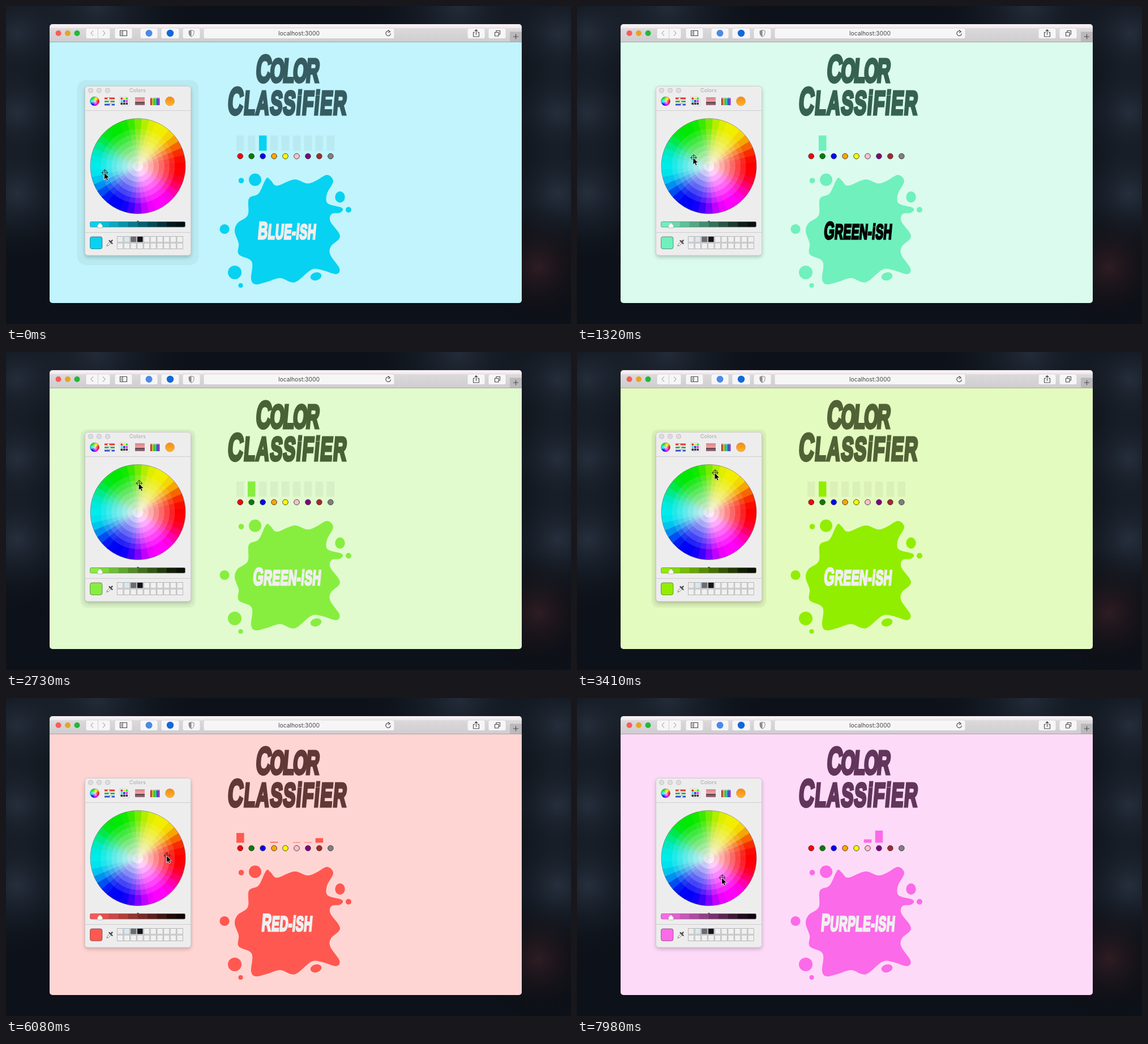
Write an HTML page with a canvas that moves like this. It is 998 px wide and 561 px high and loops after 8000 ms.

```html
<!DOCTYPE html>
<html lang="en">
<head>
<meta charset="utf-8">
<title>Color Classifier</title>
<style>
  html, body { margin: 0; width: 100%; height: 100%; overflow: hidden; background: #080b12; }
  canvas, svg { position: absolute; left: 0; top: 0; width: 998px; height: 561px; display: block; }
  .ui { font-family: Inter, "Liberation Sans", sans-serif; text-anchor: middle; }
  .comic { font-family: "Liberation Sans", Arial, sans-serif; font-weight: 700; text-anchor: middle; stroke-linejoin: miter; }
  .ink { fill: var(--ink); stroke: var(--ink); }
  .splat { fill: var(--c); }
  .btn { fill: #f7f6f7; stroke: #c9c7c9; stroke-width: .6; }
  .line { fill: none; stroke: #4a4a4a; stroke-width: 1.1; }
  .panel { filter: drop-shadow(0 3px 3px rgba(0,0,0,.2)); }
</style>
</head>
<body>
<canvas id="photo" width="998" height="561"></canvas>
<svg id="stage" viewBox="0 0 998 561">
  <defs>
    <clipPath id="win"><rect x="77" y="32" width="834" height="492" rx="5"/></clipPath>
    <clipPath id="barClip"><rect x="148.5" y="380.5" width="168" height="9.5" rx="2"/></clipPath>
    <linearGradient id="tool" x2="0" y2="1">
      <stop offset="0" stop-color="#f7f0f4"/><stop offset=".18" stop-color="#f3edf0"/>
      <stop offset=".26" stop-color="#dcd9db"/><stop offset="1" stop-color="#cfcdcf"/>
    </linearGradient>
    <linearGradient id="dusk" x2="0" y2="1">
      <stop offset="0" stop-color="#d67fa0"/><stop offset=".55" stop-color="#f0a890"/>
      <stop offset=".6" stop-color="#5a4550"/><stop offset="1" stop-color="#a76f80"/>
    </linearGradient>
    <linearGradient id="amber" x2="0" y2="1">
      <stop offset="0" stop-color="#f58a12"/><stop offset="1" stop-color="#fcb433"/>
    </linearGradient>
  </defs>

  <g clip-path="url(#win)">
    <rect x="77" y="63" width="834" height="461" fill="var(--bg)"/>
    <rect x="77" y="32" width="834" height="31" fill="url(#tool)"/>
    <path d="M77 63.5H911" stroke="#a8a6a8"/>
    <rect x="890" y="45.5" width="21" height="17.5" fill="#bab8ba"/>
    <path class="line" d="M900.5 49.5v9M896 54h9"/>
    <g id="buttons"></g>
    <circle cx="92.5" cy="48" r="5" fill="#fc5b57"/>
    <circle cx="109" cy="48" r="5" fill="#e5a524"/>
    <circle cx="125.5" cy="48" r="5" fill="#22b83a"/>
    <path d="M162.5 39.5v18" stroke="#d0ced0"/>
    <path class="line" style="stroke:#a6a6a6" d="M154 43.5l-4 4.5 4 4.5M171 43.5l4 4.5-4 4.5"/>
    <path class="line" d="M201.5 43.5h12v9h-12zM206 43.5v9M203 46h1.5M203 48h1.5M203 50h1.5"/>
    <circle cx="252.5" cy="48" r="6" fill="#4a8ae8"/>
    <circle cx="290" cy="48" r="6.2" fill="#1268d8"/>
    <path d="M327.5 42.5l4.5 1.5v4q0 4-4.5 6.5-4.5-2.5-4.5-6.5v-4z" fill="#f7f6f7" stroke="#8b8b8b"/>
    <path d="M327.5 42.5v12q-4.5-2.5-4.5-6.5v-4z" fill="#8b8b8b"/>
    <text class="ui" x="517.5" y="52" font-size="10.3" fill="#454545">localhost:3000</text>
    <path class="line" d="M678.5 45.5a4.3 4.3 0 1 0 1 3M675 42.5l3.5 3-4 1.5"/>
    <path class="line" d="M828 46.5h-2.5v7.5h10v-7.5h-2.5M830.5 51v-9M827.8 44.5l2.7-2.7 2.7 2.7"/>
    <path class="line" d="M863.5 46.5h6.5v6.5h-6.5zM866 46v-2.500h6.500v6.500h-2"/>
  </g>

  <g id="title" class="ink"></g>
  <g id="bars"></g>
  <g id="splat" class="splat"></g>
  <g id="label"></g>

  <rect id="halo" fill="#000" fill-opacity=".045"/>
  <g class="panel"><rect x="139.5" y="141.5" width="187" height="298.5" rx="5" fill="#eeedee" stroke="#c3c3c3" stroke-width=".7"/></g>
  <g fill="#dfdddf" stroke="#c2c0c2">
    <circle cx="149.5" cy="149" r="4"/><circle cx="164.5" cy="149" r="4"/><circle cx="179.5" cy="149" r="4"/>
  </g>
  <text class="ui" x="232.5" y="152" font-size="8.8" letter-spacing=".3" fill="#a2a0a2">Colors</text>
  <g id="tabs"></g>
  <path d="M140 184.5H326M140 399.5H326" stroke="#cfcdcf"/>
  <g id="wheel"></g>
  <g id="slider" clip-path="url(#barClip)"></g>
  <rect x="148.5" y="380.5" width="168" height="9.5" rx="2" fill="none" stroke="#777" stroke-opacity=".7"/>
  <path d="M231 379h4l-2 2.5z" fill="#444"/>
  <path d="M166 382.5l4.5 4.5v4.5h-9v-4.5z" fill="#fff" stroke="#999" stroke-width=".6"/>
  <rect x="148.5" y="407" width="21.5" height="21.5" rx="3.5" fill="var(--c)" stroke="#000" stroke-opacity=".4"/>
  <path d="M178 423.5l1-3 5-5 2 2-5 5z" fill="#fff" stroke="#666" stroke-width=".9"/>
  <path d="M182.5 414l5 5M185 416.5l2.5-3" stroke="#4a4a4a" stroke-width="2.4" stroke-linecap="round"/>
  <g id="grid"></g>
  <g id="cross" fill="none" stroke="#222" stroke-opacity=".85"><circle r="4.2"/><path d="M-6 0H6M0-6V6"/></g>
  <path id="arrow" d="M0 0V12.5L2.9 9.8 4.8 14 7 13 5.2 9H9Z" fill="#000" stroke="#fff" stroke-width=".8"/>
</svg>

<script>
const LOOP = 8000, TICK = 108.5, LEAD = 17;
const NAMES = ['red', 'green', 'blue', 'orange', 'yellow', 'pink', 'purple', 'brown', 'gray'];

// Key picks on the wheel; "at" counts ticks, "mix" holds the classifier's scores.
const PICKS = [
  { at: 0, x: 174.5, y: 294, hsv: [188, .97, .945], halo: 14, mix: { blue: 1 } },
  { at: 12, x: 206, y: 267.5, hsv: [155.6, .533, .941], halo: 0, mix: { green: 1 } },
  { at: 20, x: 228, y: 247, hsv: [106, .504, .933], halo: 8, mix: { green: 1 } },
  { at: 31, x: 244, y: 213, hsv: [83.4, 1, .933], halo: 8, mix: { green: 1 } },
  { at: 36, x: 264, y: 224, hsv: [62, 1, .94], halo: 11, mix: { yellow: .9, green: .1 } },
  { at: 41, x: 280, y: 242, hsv: [43.5, 1, .957], halo: 14, mix: { green: .03, orange: .42, yellow: .05, brown: .57 } },
  { at: 55, x: 284.5, y: 278, hsv: [2.7, .686, 1], halo: 0, mix: { red: .64, orange: .06, pink: .03, purple: .03, brown: .3 } },
  { at: 73, x: 256.5, y: 317, hsv: [-52.1, .578, .984], halo: 0, mix: { pink: .22, purple: .8 } }
];

const $ = id => document.getElementById(id);
const stage = $('stage');

function set(el, attrs) {
  for (const k in attrs) el.setAttribute(k, attrs[k]);
  return el;
}
function add(parent, tag, attrs, text = '') {
  const el = set(document.createElementNS('http://www.w3.org/2000/svg', tag), attrs);
  if (text) el.textContent = text;
  parent.append(el);
  return el;
}
const rect = (g, x, y, width, height, more) => add(g, 'rect', { x, y, width, height, ...more });
const dot = (g, cx, cy, r, more) => add(g, 'circle', { cx, cy, r, ...more });

function hsv(h, s, v) {
  const channel = n => {
    const k = (n + h / 60 + 12) % 6;
    return Math.round(255 * v * (1 - s * Math.max(0, Math.min(k, 4 - k, 1))));
  };
  return [5, 3, 1].map(channel);
}
const rgb = c => `rgb(${c})`;

// Backdrop: frosty blue down both sides, dark above and below, a rusty corner.
function paintPhoto() {
  const ctx = $('photo').getContext('2d');
  const glow = (x, y, r, color) => {
    const g = ctx.createRadialGradient(x, y, 0, x, y, r);
    g.addColorStop(0, color);
    g.addColorStop(1, 'transparent');
    ctx.fillStyle = g;
    ctx.fillRect(0, 0, 998, 561);
  };
  ctx.fillStyle = '#0d1119';
  ctx.fillRect(0, 0, 998, 561);
  for (const x of [20, 975])
    for (const y of [50, 190, 330]) glow(x, y, 150, 'rgba(84,106,130,.34)');
  glow(160, 0, 200, 'rgba(84,106,130,.3)');
  glow(800, 0, 200, 'rgba(84,106,130,.3)');
  glow(940, 460, 110, 'rgba(96,46,50,.4)');
}

// Condensed small-cap lettering with a larger first letter.
function word(g, text, x, y, size, weight, spacing) {
  g.replaceChildren();
  const el = add(g, 'text', {
    class: 'comic', 'font-size': size, 'stroke-width': weight, 'letter-spacing': spacing,
    transform: `translate(${x} ${y}) skewX(-5) scale(.56 1)`
  });
  add(el, 'tspan', { 'font-size': size * 1.16 }, text[0]);
  add(el, 'tspan', {}, text.slice(1).toUpperCase().replace(/I/g, 'i'));
}

function buildBars() {
  const g = $('bars');
  const tracks = add(g, 'g', { fill: '#000', 'fill-opacity': .045 });
  const bars = NAMES.map((fill, i) => {
    const x = 407 + i * 19.95;
    rect(tracks, x, 228.5, 13.5, 27);
    dot(g, x + 6.7, 265, 4.8, { fill, stroke: '#333', 'stroke-width': .9 });
    return rect(g, x, 255, 13.5, 0, { class: 'splat' });
  });
  return { tracks, bars };
}

// Closed Catmull-Rom curve through "x,y" points.
function smooth(text) {
  const pts = text.trim().split(/\s+/).map(p => p.split(',').map(Number));
  const p = i => pts[(i + pts.length) % pts.length];
  const lean = (a, b, c, sign) => b.map((v, k) => v + sign * (c[k] - a[k]) / 6);
  return 'M' + p(0) + pts.map((b, i) =>
    `C${lean(p(i - 1), b, p(i + 1), 1)} ${lean(b, p(i + 1), p(i + 2), -1)} ${p(i + 1)}`).join('') + 'Z';
}

function buildSplat() {
  const g = $('splat');
  add(g, 'path', { d: smooth(`
    457,309 462,303 468,308 479,317 509,306 532,313 548,308 567,298 578,309 567,331 568,348
    591,355 595,360 589,365 575,367 573,380 590,406 574,424 573,439 589,463 583,473 559,466
    540,465 515,485 503,487 484,480 460,487 441,491 433,482 434,451 411,438 411,419 404,398
    409,383 427,369 429,340 446,331`) });
  dot(g, 415.5, 308, 4.8);
  dot(g, 440, 306.5, 11);
  dot(g, 605, 359.5, 5);
  dot(g, 386, 393.5, 8.6);
  dot(g, 404, 470, 12);
  dot(g, 414.5, 493, 4.1);
  add(g, 'ellipse', { cx: 590, cy: 337, rx: 8.7, ry: 10 });
  add(g, 'ellipse', { rx: 10, ry: 7, transform: 'translate(547.5 477) rotate(-15)' });
}

// Stepped color wheel; hues linger around the six pure colors.
function wheel(g, cx, cy, R, sectors, rings) {
  const step = 2 * Math.PI / sectors;
  const at = (r, a) => `${cx + r * Math.cos(a)} ${cy - r * Math.sin(a)}`;
  for (let k = rings; k > 0; k--) {
    const r = R * k / rings;
    const sat = Math.min(1, (k - .6) / rings * 1.22);
    for (let i = 0; i < sectors; i++) {
      const mid = i * step, a = mid - step / 2, b = mid + step / 2 + .02;
      const hue = i * 360 / sectors - 8 * Math.sin(6 * mid);
      const val = .955 + .045 * Math.cos(mid + Math.PI / 4);
      add(g, 'path', { fill: rgb(hsv(hue, sat, val)), d: `M${cx} ${cy}L${at(r, a)}A${r} ${r} 0 0 0 ${at(r, b)}Z` });
    }
  }
  dot(g, cx, cy, R, { fill: 'none', stroke: '#555', 'stroke-opacity': .6, 'stroke-width': .8 });
}

function buildPanel() {
  [[141, 43], [192, 31], [237, 31], [274, 32], [312, 31], [349, 337], [815, 31], [852, 31]]
    .forEach(([x, w]) => rect($('buttons'), x, 39, w, 18.5, { rx: 3, class: 'btn' }));

  const tabs = $('tabs');
  const thin = { fill: '#fff', stroke: '#aaa', 'stroke-width': .5 };
  wheel(tabs, 156.5, 168, 8, 18, 3);
  ['#e8322e', '#36b34a', '#3a50d0'].forEach((fill, i) => {
    const y = 161.5 + i * 5.5;
    rect(tabs, 174, y, 18, 3, { fill });
    dot(tabs, 181 + i * 2, y + 2, 1.8, thin);
  });
  rect(tabs, 201, 160, 12, 12, thin);
  rect(tabs, 206, 165, 11, 11, thin);
  for (let i = 0; i < 9; i++)
    rect(tabs, 202.5 + i % 3 * 4.5, 161.5 + (i / 3 | 0) * 4.5, 3.6, 3.6,
      { fill: i < 6 ? rgb(hsv(i * 60, .8, .9)) : '#333' });
  rect(tabs, 228, 161, 17, 14, { fill: 'url(#dusk)' });
  for (let i = 0; i < 6; i++)
    add(tabs, 'path', { fill: rgb(hsv(i * 56, .82, .75)), d: `M${255 + i * 2.75} 175v-11l1.3-3 1.3 3v11z` });
  dot(tabs, 289.5, 168, 8, { fill: 'url(#amber)', stroke: '#d98c20', 'stroke-width': .5 });

  wheel($('wheel'), 233, 282.5, 84, 40, 9);

  rect($('slider'), 148, 380, 169, 11, { fill: 'var(--c)' });
  for (let i = 0; i < 10; i++)
    rect($('slider'), 148 + i * 16.9, 380, 17, 11, { 'fill-opacity': Math.min(.93, (i / 9) ** 1.1) });

  const filled = ['#ebebeb', '#d7e8f4', '#6b6b72', '#12141a'];
  for (let i = 0; i < 20; i++)
    rect($('grid'), 196.5 + i % 10 * 11.72, 406.5 + (i / 10 | 0) * 11.7, 10.3, 10.3,
      { fill: filled[i] || '#f1f0f1', stroke: '#b0b0b0', 'stroke-width': .9 });
}

function pickAt(tick) {
  const next = Math.max(1, PICKS.findIndex(p => p.at >= tick));
  const a = PICKS[next - 1], b = PICKS[next];
  const u = (tick - a.at) / (b.at - a.at);
  const lerp = (p = 0, q = 0) => p + (q - p) * u;
  return {
    x: lerp(a.x, b.x), y: lerp(a.y, b.y), halo: lerp(a.halo, b.halo),
    color: a.hsv.map((v, i) => lerp(v, b.hsv[i])),
    scores: NAMES.map(n => lerp(a.mix[n], b.mix[n]))
  };
}

let shown = '';
function draw(now) {
  const tick = Math.max(0, Math.floor((now % LOOP - LEAD) / TICK));
  const { x, y, halo, color, scores } = pickAt(tick);
  const c = hsv(...color);
  stage.style.setProperty('--c', rgb(c));
  stage.style.setProperty('--bg', rgb(c.map(v => Math.round(255 - (255 - v) / 4))));
  stage.style.setProperty('--ink', rgb(hsv(color[0], .45, .385)));

  set($('cross'), { transform: `translate(${x} ${y})` });
  set($('arrow'), { transform: `translate(${x - 1} ${y})` });
  set($('halo'), {
    x: 139.5 - halo, y: 144.5 - halo, width: 187 + 2 * halo, height: 298.5 + 2 * halo,
    rx: 5 + halo * .8, opacity: halo > 4 ? 1 : 0
  });
  set(tracks, { opacity: halo > 4 ? 1 : 0 });
  scores.forEach((s, i) => set(bars[i], { y: 255.3 - 26.8 * s, height: 26.8 * s }));

  const name = NAMES[scores.indexOf(Math.max(...scores))];
  const label = name[0].toUpperCase() + name.slice(1) + '-ish';
  if (label !== shown) word($('label'), shown = label, 495.5, 410.5, 37, 3, .6);
  const bright = c[0] * .299 + c[1] * .587 + c[2] * .114;
  const tone = bright > 190 ? '#050505' : '#f0eff0';
  set($('label'), { fill: tone, stroke: tone });
}

paintPhoto();
word(add($('title'), 'g'), 'Color', 495, 134, 58, 5, -4);
word(add($('title'), 'g'), 'Classifier', 496, 191, 58, 5, 2.6);
const { tracks, bars } = buildBars();
buildSplat();
buildPanel();
(function frame() {
  draw(performance.now());
  requestAnimationFrame(frame);
})();
</script>
</body>
</html>
```
